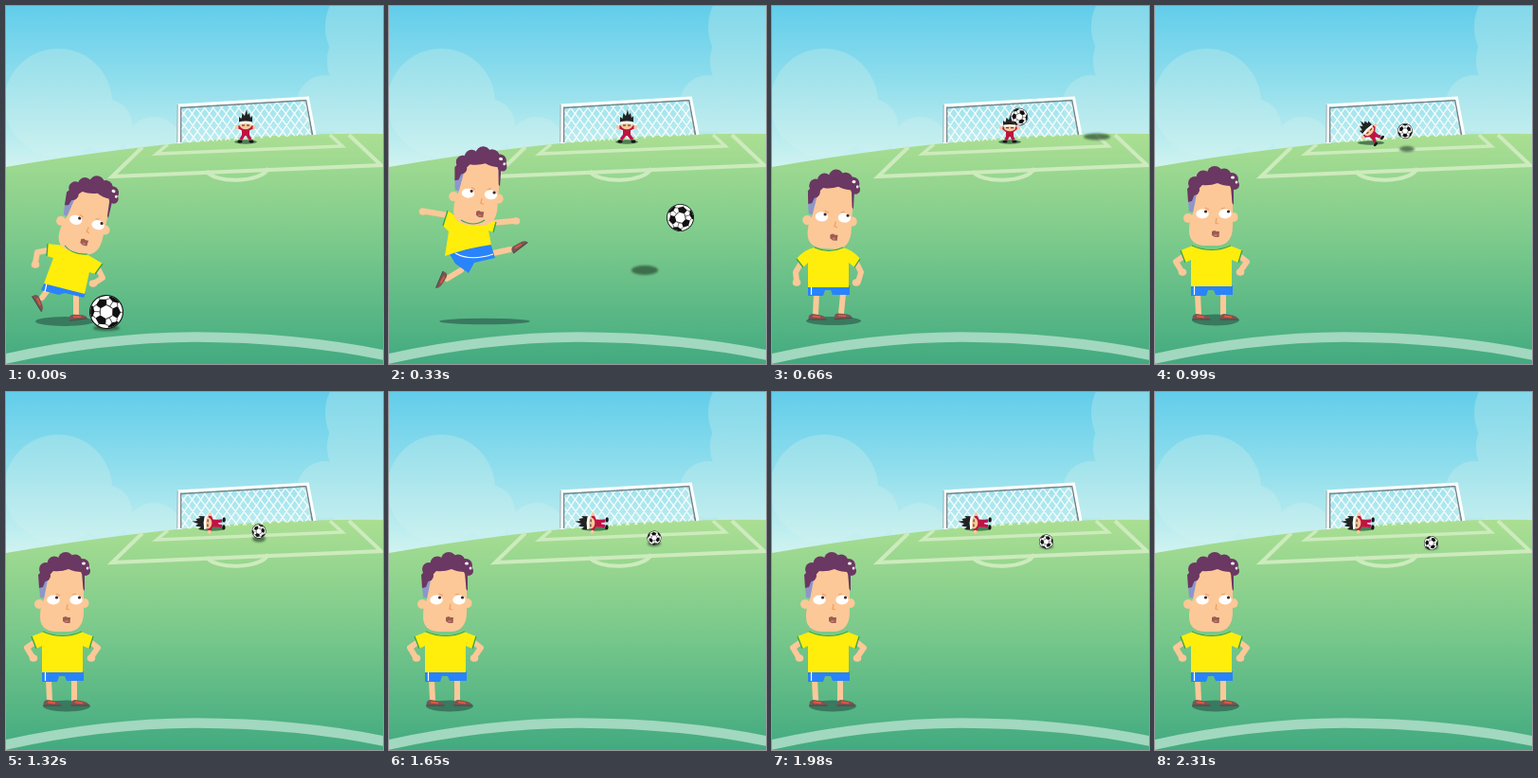
These frames come from a looping animation (398x378 px, 3300 ms). An HTML page with a canvas:

```html
<!DOCTYPE html>
<html>
<head>
<meta charset="utf-8">
<style>
html, body { margin: 0; width: 100%; height: 100%; overflow: hidden; }
canvas { display: block; }
</style>
</head>
<body>
<canvas id="stage" width="398" height="378"></canvas>
<script>
const c = document.getElementById('stage').getContext('2d');
const SKIN = '#fcc898', HAIR = '#6b3763', BLUE = '#2983fb', YELLOW = '#ffee0b', GREEN = '#35a34a';
const STEP = 330, LOOP = 3300;

function fill(path, color) {
  c.fillStyle = color;
  c.fill(new Path2D(path));
}
function line(path, color, width, cap = 'butt') {
  c.strokeStyle = color;
  c.lineWidth = width;
  c.lineCap = cap;
  c.lineJoin = cap === 'round' ? 'round' : 'miter';
  c.stroke(new Path2D(path));
}
function oval(x, y, rx, ry, color, turn = 0) {
  c.fillStyle = color;
  c.beginPath();
  c.ellipse(x, y, rx, ry, turn, 0, 7);
  c.fill();
}
function gradient(y0, y1, ...colors) {
  const g = c.createLinearGradient(0, y0, 0, y1);
  colors.forEach((color, i) => g.addColorStop(i / (colors.length - 1), color));
  return g;
}
function placed(x, y, degrees, draw) {
  c.save();
  c.translate(x, y);
  c.rotate(degrees * Math.PI / 180);
  draw();
  c.restore();
}
function softShadow(x, y, rx, ry) {
  c.save();
  c.filter = 'blur(1px)';
  oval(x, y, rx, ry, 'rgba(40,70,45,.68)');
  c.restore();
}

function scenery() {
  c.fillStyle = gradient(0, 170, '#62cdea', '#93dfed', '#d0f3f0');
  c.fillRect(0, 0, 398, 378);

  // Overlapping circles share one fill, so each cloud stays even
  const cloud = gradient(0, 165, '#83d8ea', '#a6e4ec', '#cff2f0');
  for (const [x, y, r] of [[55, 102, 57], [105, 126, 28], [156, 147, 30],
                           [390, 22, 53], [384, 58, 45], [337, 103, 30], [385, 110, 45]])
    oval(x, y, r, r, cloud);

  fill('M0 170Q130 147.5 255 138.5Q340 134 398 135V378H0Z',
    gradient(135, 378, '#abdf92', '#78c88b', '#42aa80'));
  const chalk = '#cdebbd';
  line('M144 149L112 180L396 168L362 136', chalk, 4);
  line('M171 146L159 156L355 148L342 136', chalk, 3.5);
  line('M212 174C219 188 271 187 277 171', chalk, 4);
  line('M-3 373Q100 350 200 349.5Q310 350 401 369', '#a2d8bf', 10.5);
}

function goal() {
  c.save();
  c.clip(new Path2D('M183 106L317 98L325 136L183 145Z'));
  let net = '';
  for (let x = 110; x < 400; x += 9)
    net += `M${x} 95l42 54M${x} 149l36 -54`;
  line(net, 'rgba(255,255,255,.88)', 1.3);
  c.restore();
  line('M184.5 106V144M184 107.5L317 99.5L323.5 136', '#77858b', 1.6);
  line('M182.5 145V105L318.5 97L326 136', '#fff', 3);
  line('M180.8 144L181.2 104', '#8e999b', .8);
}

// A white hexagon faces the viewer, with three near patches and three on the rim
function ball(x, y, r, turn) {
  placed(x, y, turn, () => {
    c.scale(r, r);
    oval(0, 0, 1, 1, '#111');
    oval(0, 0, .94, .94, '#fff');
    c.beginPath();
    c.arc(0, 0, .94, 0, 7);
    c.clip();
    for (let i = 0; i < 3; i++) {
      fill('M-.2 -.35H.2L.35 -.65L0 -.84L-.35 -.65Z', '#111');
      line('M.2 -.35L.34 -.2M-.2 -.35L-.34 -.2M.35 -.65L.58 -.6M-.35 -.65L-.58 -.6M0 -.84V-1', '#555', .05);
      c.rotate(Math.PI / 3);
      line('M-.2 -.36H.2M0 -.36V-.74', '#555', .05);
      fill('M0 -.7L.32 -.8L.4 -1.1H-.4L-.32 -.8Z', '#111');
      c.rotate(Math.PI / 3);
    }
  });
}

// Origin is between the feet
function keeper(x, y, turn, stance, raised) {
  placed(x, y, turn, () => {
    if (raised) c.scale(1, .85);
    const hand = raised ? -18 : -16;
    line(`M-2 -8L${-stance + 1} -3M2 -8L${stance - 1} -3`, '#c01050', 3.4);
    oval(-stance, -1, 2.6, 1.7, '#151515');
    oval(stance, -1, 2.6, 1.7, '#151515');
    line(`M-3 -14L-7 ${hand}M3 -14L7 ${hand}`, '#bd1540', 3.4, 'round');
    oval(-9.3, hand, 1.9, 1.9, SKIN);
    oval(9.3, hand, 1.9, 1.9, SKIN);
    fill('M-4 -16H4L4 -7H-4Z', '#bd1540');
    oval(0, -18, 6, 4.3, SKIN);
    fill('M-7 -21L-7 -27L-4.5 -25L-3.5 -31L-1 -28L1 -35L2 -29L4 -31L5 -26L7 -28L7 -21Z', '#222');
    line('M-6.5 -20.5Q0 -22 6.5 -20.5', '#fff', 2.4);
    line('M-4 -18H-1M1 -18H4', '#222', 1);
  });
}

// Origin is midway between the eyes
function head(x, y, turn) {
  placed(x, y, turn, () => {
    oval(-27, 5, 5, 5, SKIN);
    oval(21, 4, 4.5, 5, SKIN);
    fill('M-27 -13L-16 -28L-21 -1L-26 -2Z', '#8d97ca');
    fill('M-17 -26L-9 -37H17L20 -10V13Q20 33 4 34H-10Q-26 33 -26 18Q-26 7 -22 0Z', SKIN);
    for (const [hx, hy, r] of [[-21, -25, 6], [-20, -32, 7], [-11, -38, 7.5], [1, -42, 8],
                               [11, -40, 7.5], [19, -36, 7], [22, -30, 5]])
      oval(hx, hy, r, r, HAIR);
    fill('M-27 -12L-28 -26L-10 -42H15L21 -28L21 -9L19.5 -11L18 -29Q10 -29 4 -32Q-4 -29 -12 -30Q-20 -23 -23 -13Z', HAIR);
    oval(20, -38, 2, 1.6, '#fff');
    oval(24, -33, 1.3, 1.6, '#fff');
    for (const ex of [-12, 12]) {
      oval(ex, 0.5, 6.7, 5, '#fff');
      oval(ex + 3.5, -2, 1.6, 1.5, '#3a2a2c');
    }
    line('M-9 -6L-5 -4M8 -5L12 -6', '#ee9d69', 1.1);
    line('M3 5L2 10L5 11', '#f3a060', 1.3);
    fill('M-2 19L1 18L3 19L6 19L5.5 25L1 25L-2 23Z', '#9c5c52');
    oval(2, 23, 1.8, 1.2, '#c2766c');
  });
}

function shoe([x, y, turn]) {
  placed(x, y, turn, () => {
    fill('M-9.5 3Q-10 -3 -5 -3L1 -2Q9 -1 9.5 3Z', '#795653');
    line('M-5 -.5L3 .5', '#e2563e', 1.8);
    line('M-9.5 3H9.5', '#4f4747', 1);
  });
}

function player(p) {
  oval(...p.shadow, '#39795f');
  line(p.legs, SKIN, 6, 'round');
  p.shoes.forEach(shoe);
  line(p.arms, SKIN, 6, 'round');
  for (const [x, y] of p.hands) oval(x, y, 4.3, 3.8, SKIN);
  fill(p.shorts, BLUE);
  line(p.stripe, '#fff', 1.2);
  fill(p.shirt, YELLOW);
  line(p.cuffs, GREEN, 1.3);
  head(...p.head);
  line(p.collar, GREEN, 1.1);
}

const shorts = {
  shorts: 'M38 295H82V305H64L62 300H56L54 306H38Z',
  stripe: 'M41.5 296V305'
};
const runUp = {
  shadow: [62, 333, 31, 5],
  legs: 'M44 300L38 308M74 305V325',
  shoes: [[35, 313, 58], [76, 328, -8]],
  arms: 'M44 258L33 260L31 271M97 277L102 287L94 292',
  hands: [[31, 273], [92, 293]],
  shorts: 'M41 291L84 303L82 308L62 303L56 305L37 300Z',
  stripe: 'M43 293L41 302',
  shirt: 'M44 251L62 253Q70 263 85 262L102 272L94 283L88 281L83 304L40 293L50 266L43 264Z',
  cuffs: 'M44 251L43 264M102 272L94 283',
  collar: 'M62 253Q70 263 86 262',
  head: [85.5, 228, 13]
};
const kick = {
  shadow: [101, 333, 48, 3.2],
  legs: 'M76 279L61 288M110 261L128 257',
  shoes: [[56, 290, 113], [137, 253, -38]],
  arms: 'M62 221L39 217M109 229L131 227',
  hands: [[36, 217], [134, 227]],
  shorts: 'M64 262L107 250L112 266L90 271L84 282L70 272Z',
  stripe: 'M70 261Q86 270 110 262',
  shirt: 'M62 216L76 226Q89 234 100 226L113 228L110 239L105 237L108 252Q84 255 59 264L63 238L57 232Z',
  cuffs: 'M62 216L57 232M113 228L110 239',
  collar: 'M76 226Q89 234 101 226',
  head: [95.5, 198, 4]
};
const landed = {
  ...shorts,
  shirt: 'M45 255Q60 261 74 255Q85 257 93 267L87 276L81 271V297H38V271L33 276L26 267Q34 257 45 255Z',
  cuffs: 'M26 267L33 276M93 267L87 276',
  collar: 'M45 255Q60 262 75 255',
  shadow: [65, 332.5, 29, 4.5],
  legs: 'M47 304L46 325M75 304L73 325',
  shoes: [[48, 328, 0], [75, 327, -5]],
  arms: 'M31 271L25 281L26 291M89 271L94 281L91 291',
  hands: [[26, 292], [89, 292]],
  head: [64.5, 222.5, 3]
};
const watching = {
  ...shorts,
  shirt: 'M40 253Q60 261 79 253L92 258L88 271L81 268V296H38V268L32 271L27 258Z',
  cuffs: 'M27 258L32 271M92 258L88 271',
  collar: 'M39 253Q60 262 80 253',
  shadow: [64, 331.5, 25, 6],
  legs: 'M45 304L46 325M72 304V325',
  shoes: [[49, 328, 0], [78, 328, 0]],
  arms: 'M32 263L22 270L28 280M88 263L97 270L90 280',
  hands: [[29, 281], [90, 281]],
  head: [62, 219, 0]
};

// One entry per step: player, keeper, ball [x, y, r, turn], ball shadow
const lying = [231, 139, -88, 4, false];
const scenes = [
  [runUp, [253, 144, 0, 6, false], [106, 323, 18, -28], [106, 340, 14, 3]],
  [kick, [251, 144, 0, 7, false], [307.5, 223.5, 14.5, 15], [270, 279, 14, 5]],
  [landed, [251, 144, 0, 5, true], [261, 117, 9.3, 35], [343, 138, 14, 3.5]],
  [watching, [237, 143, -45, 5, true], [264, 132, 8, 60], [266, 151, 8, 3]],
  [watching, lying, [267, 147, 7.5, 80], [267, 155, 7, 3.5]],
  [watching, lying, [280, 154, 7.5, 115], [280, 160, 7, 3]],
  [watching, lying, [289.5, 158, 7.5, 145], [290, 163, 7, 2.5]],
  [watching, lying, [291.5, 159.5, 7.5, 155], [292, 164, 7, 2.5]]
];

function frame() {
  const step = Math.min(7, Math.floor(performance.now() % LOOP / STEP));
  const [pose, guard, shot, shade] = scenes[step];
  scenery();
  goal();
  const shadowX = step < 3 ? guard[0] : step === 3 ? 228 : 217;
  oval(shadowX, step < 3 ? 143.5 : 144.5, step < 3 ? 12 : 14, 2.2, '#4e7c53');
  keeper(...guard);
  softShadow(...shade);
  player(pose);
  ball(...shot);
  requestAnimationFrame(frame);
}
frame();
</script>
</body>
</html>
```
